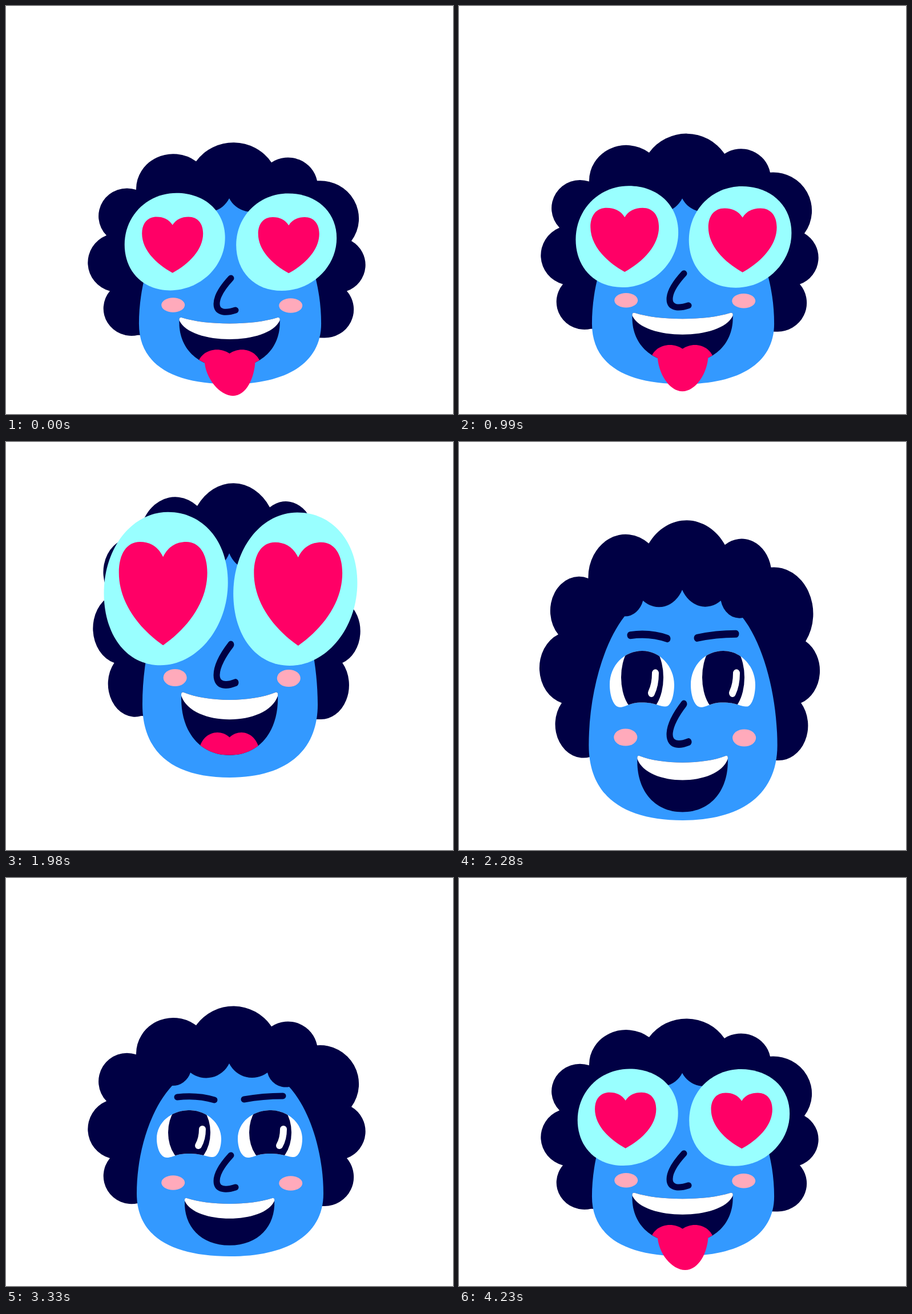
An HTML page for the animation above (4.26 s loop, 783x715 px).

```html
<!DOCTYPE html>
<html lang="en">
<head>
<meta charset="utf-8">
<title>Heart eyes</title>
<style>
  html, body { margin: 0; width: 100%; height: 100%; overflow: hidden; background: #fff; }
  svg { display: block; width: 100%; height: 100%; }
  .ink { fill: #000044; }
  .line { fill: none; stroke: #000044; stroke-width: 11; stroke-linecap: round; }
  .shine { fill: none; stroke: #fff; stroke-width: 12; stroke-linecap: round; }
  .skin { fill: #3399ff; }
  .white { fill: #fff; }
  .blush { fill: #ffaabb; }
  .glass { fill: #99ffff; }
  .love { fill: #ff0066; }
</style>
</head>
<body>
<svg viewBox="0 0 783 715">
  <defs>
    <path id="mouthShape" d="M-84,-1 C-40,13 40,13 84,-1 Q89,-2 88,4 C90,51 57,87 0,87 C-57,87 -90,51 -88,4 Q-89,-2 -84,-1Z"/>
    <clipPath id="mouthClip"><use href="#mouthShape"/></clipPath>
    <path id="eyeShape" d="M282,83 C270,83 264,65 264,50 C264,21 290,0 321,0 C352,0 377,23 377,50 C377,66 371,82 362,82 C350,82 345,76 320,76 C298,76 292,83 282,83Z"/>
    <clipPath id="eyeClip"><use href="#eyeShape"/></clipPath>
    <g id="eye">
      <use href="#eyeShape" class="white"/>
      <ellipse class="ink" cx="321" cy="39" rx="37" ry="54" clip-path="url(#eyeClip)"/>
      <path class="shine" d="M344,33 Q344,50 337,62"/>
    </g>
    <path id="glassShape" d="M3,-86 C52,-86 88,-54 88,-7 C88,44 44,86 -8,86 C-56,86 -88,52 -88,5 C-88,-46 -48,-86 3,-86Z"/>
    <path id="heartShape" d="M0,-35 C6,-45 16,-49.5 28,-49.5 C44,-49.5 53.5,-38 53.5,-20 C53.5,8 30,33 0,49.5 C-30,33 -53.5,8 -53.5,-20 C-53.5,-38 -44,-49.5 -28,-49.5 C-16,-49.5 -6,-45 0,-35Z"/>
  </defs>

  <path id="hair" class="ink" d="M231,570 A49,49 0 0 1 182,491 A53,53 0 0 1 176,391 A50,50 0 0 1 228,309
    A65,63 0 0 1 333,258 A80,80 0 0 1 465,260 A52,52 0 0 1 545,293 A68,68 0 0 1 605,401
    A50,50 0 0 1 597,491 A51,51 0 0 1 556,575Z"/>
  <path id="face" class="skin" d="M291,364 A33,33 0 0 0 323,341 A45,45 0 0 0 391,325 A45,45 0 0 0 458,341 A33,33 0 0 0 496,366
    C532,405 556,480 556,553 C556,625 494,663 392,663 C290,663 229,628 229,553 C229,480 253,405 291,364Z"/>
  <ellipse id="cheekL" class="blush" rx="20.5"/>
  <ellipse id="cheekR" class="blush" rx="20.5"/>

  <g id="mouth">
    <use href="#mouthShape" class="ink"/>
    <path class="white" d="M-84,-1 C-40,13 40,13 84,-1 Q89,-2 88,4 C68,48 -68,48 -88,4 Q-89,-2 -84,-1Z"/>
    <g clip-path="url(#mouthClip)">
      <path id="tongueBase" class="love" d="M-56,82 C-52,56 -20,48 0,62 C20,48 50,56 55,82 V110 H-56Z"/>
    </g>
    <path id="tongueTip" class="love"/>
  </g>

  <g id="eyes">
    <use href="#eye"/>
    <use href="#eye" x="142"/>
    <path class="line" d="M300,-23 Q335,-27 365,-18"/>
    <path class="line" d="M417,-19 Q450,-25 485,-25"/>
  </g>
  <path id="nose" class="line" d="M394,0 C382,13 369,31 369,45 C369,62 387,61 402,56"/>

  <g id="glassL"><use href="#glassShape" class="glass"/><use href="#heartShape" class="love"/></g>
  <g id="glassR"><use href="#glassShape" class="glass"/><use href="#heartShape" class="love"/></g>
</svg>

<script>
const LOOP = 4260, STEP = 30, BOB = 315, BEAT = LOOP / 9;
const CENTER = 392;
const part = Object.fromEntries([...document.querySelectorAll('svg [id]')].map(el => [el.id, el]));
const place = (el, transform) => el.setAttribute('transform', transform);
const show = (el, on) => el.setAttribute('visibility', on ? 'visible' : 'hidden');
const rad = deg => deg * Math.PI / 180;

// Smooth curve through keys that never overshoots them.
function curve(keys, t) {
  const last = keys.length - 1;
  if (t <= keys[0][0]) return keys[0][1];
  if (t >= keys[last][0]) return keys[last][1];
  const i = keys.findIndex(k => k[0] > t) - 1;
  const rate = j => (keys[j + 1][1] - keys[j][1]) / (keys[j + 1][0] - keys[j][0]);
  const slope = j => {
    if (j === 0 || j === last) return 0;
    const a = rate(j - 1), b = rate(j);
    return a * b > 0 ? 2 * a * b / (a + b) : 0;
  };
  const [t0, v0] = keys[i], [t1, v1] = keys[i + 1];
  const span = t1 - t0, u = (t - t0) / span, w = 1 - u;
  return v0 * w * w * (1 + 2 * u) + v1 * u * u * (3 - 2 * u)
    + span * u * w * (w * slope(i) - u * slope(i + 1));
}

const FIELDS = ['hairTop', 'hairEnd', 'hairX', 'fringe', 'chin', 'faceX', 'nose', 'cheek',
  'mouth', 'mouthX', 'mouthY', 'stretch', 'eyes', 'glass'];
const pose = (...values) => Object.fromEntries(FIELDS.map((f, i) => [f, values[i]]));
const mix = (a, b, k) => pose(...FIELDS.map(f => a[f] + (b[f] - a[f]) * k));

const hearts = pose(230, 570.5, 1, 335.4, 662.5, .976, 477, 524.5, 547, 1, 1, 1, 365, 413);
const smile = pose(225, 578, 1, 325, 663, 1, 489, 537.5, 565, .893, .94, 1, 410, 450);
const crouch = pose(258, 590, 1.01, 350, 664, .985, 492, 540, 562, 1.02, .95, .95, 425, 430);
const air = pose(72, 486, .963, 195, 588, .939, 355, 413.5, 440, .96, 1.25, 1.19, 290, 257);
const land = pose(137, 558, 1.01, 259, 663, 1.01, 459, 518, 551, .9, 1.12, 1.19, 366, 395);
const top_ = { ...air };
for (const f of ['hairTop', 'hairEnd', 'fringe', 'chin', 'nose', 'cheek', 'mouth', 'eyes', 'glass']) top_[f] -= 17;
const dip = mix(land, smile, 1.25);
const burst = { ...mix(hearts, land, .25), glass: 345 };

const timeline = [
  [0, hearts], [1660, hearts], [1800, crouch], [1980, air], [2050, top_], [2280, land],
  [2440, dip], [2580, smile], [3470, smile], [3600, dip], [3750, burst], [3890, hearts], [LOOP, hearts]
];
const bobKeys = [[1660, 1], [1780, 0], [2460, 0], [2640, .5], [3380, .5], [3500, 0], [3800, 0], [3960, 1]];
const tongueKeys = [[1680, 1], [1830, 0], [3740, 0], [3880, 1]];
const hideKeys = [[2060, 0], [2200, 1], [3640, 1], [3740, 0]];
const growKeys = [[2080, 1], [2200, 0], [3660, 0], [3740, 1]];
const leapPop = [[0, 0], [300, .035], [1660, .035], [1820, 0], [1980, .39], [2080, .3], [2200, 0]];
const popL = [...leapPop, [3670, 0], [3800, .71], [3890, .08], [4000, 0]];
const popR = [...leapPop, [3670, 0], [3760, .9], [3850, .1], [4000, 0]];

function drawGlass(el, x, side, y, pop, grow, stretch, beat) {
  show(el, grow > .01);
  const sx = grow * (1 + .6 * pop), sy = grow * (1 + .8 * pop) * stretch;
  place(el, `translate(${x + side * 40 * pop} ${y}) scale(${sx} ${sy})`);
  place(el.lastChild, `translate(${4 * side} 5.5) scale(${beat})`);
}

function draw(t) {
  const p = pose(...FIELDS.map(f => curve(timeline.map(([time, key]) => [time, key[f]]), t)));

  const turn = 60 + 360 * (t < 3650 ? t : t - LOOP) / BOB;
  const amp = curve(bobKeys, t);
  const c = Math.cos(rad(turn));
  const shift = amp * (-5.4 + 9 * c + 3.8 * c * c);
  const hairTop = p.hairTop + amp * 18 * c;
  const hairEnd = p.hairEnd + amp * 14 * Math.cos(rad(turn - 22));
  const fringe = p.fringe + amp * (9.5 * c * c - 1.6 * c);

  const hairY = (hairEnd - hairTop) / 351;
  place(part.hair, `translate(387 ${hairTop}) scale(${p.hairX} ${hairY}) translate(-387 -224)`);
  const faceY = (p.chin - fringe) / 338;
  place(part.face, `translate(392.5 ${p.chin}) scale(${p.faceX} ${faceY}) translate(-392.5 -663)`);

  const spread = 103 * (1 + (p.hairX - 1) * .9);
  [[part.cheekL, -1], [part.cheekR, 1]].forEach(([el, side]) => {
    el.setAttribute('cx', 395.7 + side * spread);
    el.setAttribute('cy', p.cheek + shift + side * .5);
    el.setAttribute('ry', 12.7 * p.stretch);
  });
  place(part.nose, `translate(0 ${p.nose + shift}) scale(1 ${p.stretch})`);

  place(part.mouth, `translate(${CENTER - .4} ${p.mouth + shift}) scale(${p.mouthX} ${p.mouthY})`);
  place(part.tongueBase, `translate(0 ${42 * curve(hideKeys, t)})`);
  const out = curve(tongueKeys, t);
  const tipX = 6 * out * Math.sin(rad(1.5 * turn + 10));
  const tipY = 80 + out * (52.3 + 4.5 * Math.sin(rad(turn)));
  const bend = 76 + 29 * out;
  show(part.tongueTip, out > 0);
  part.tongueTip.setAttribute('d', `M-44,74 C-43,${bend} ${tipX - 23},${tipY} ${tipX},${tipY}
    C${tipX + 23},${tipY} 44,${bend} 45,74Z`);

  const grow = curve(growKeys, t);
  show(part.eyes, grow < 1);
  place(part.eyes, `translate(0 ${p.eyes + shift}) scale(1 ${p.stretch})`);

  const beatTime = (t / BEAT) % 1;
  const beat = 1 + .105 * (1 - Math.cos(2 * Math.PI * beatTime ** .6));
  const glassY = p.glass + shift * 1.08;
  const stretch = p.stretch * (1 - .015 * amp * c);
  drawGlass(part.glassL, 295.7, -1, glassY, curve(popL, t), grow, stretch, beat);
  drawGlass(part.glassR, 491.2, 1, glassY + .7, curve(popR, t), grow, stretch, beat);
}

function tick(now) {
  draw(Math.floor((now % LOOP) / STEP) * STEP);
  requestAnimationFrame(tick);
}
draw(0);
requestAnimationFrame(tick);
</script>
</body>
</html>
```
